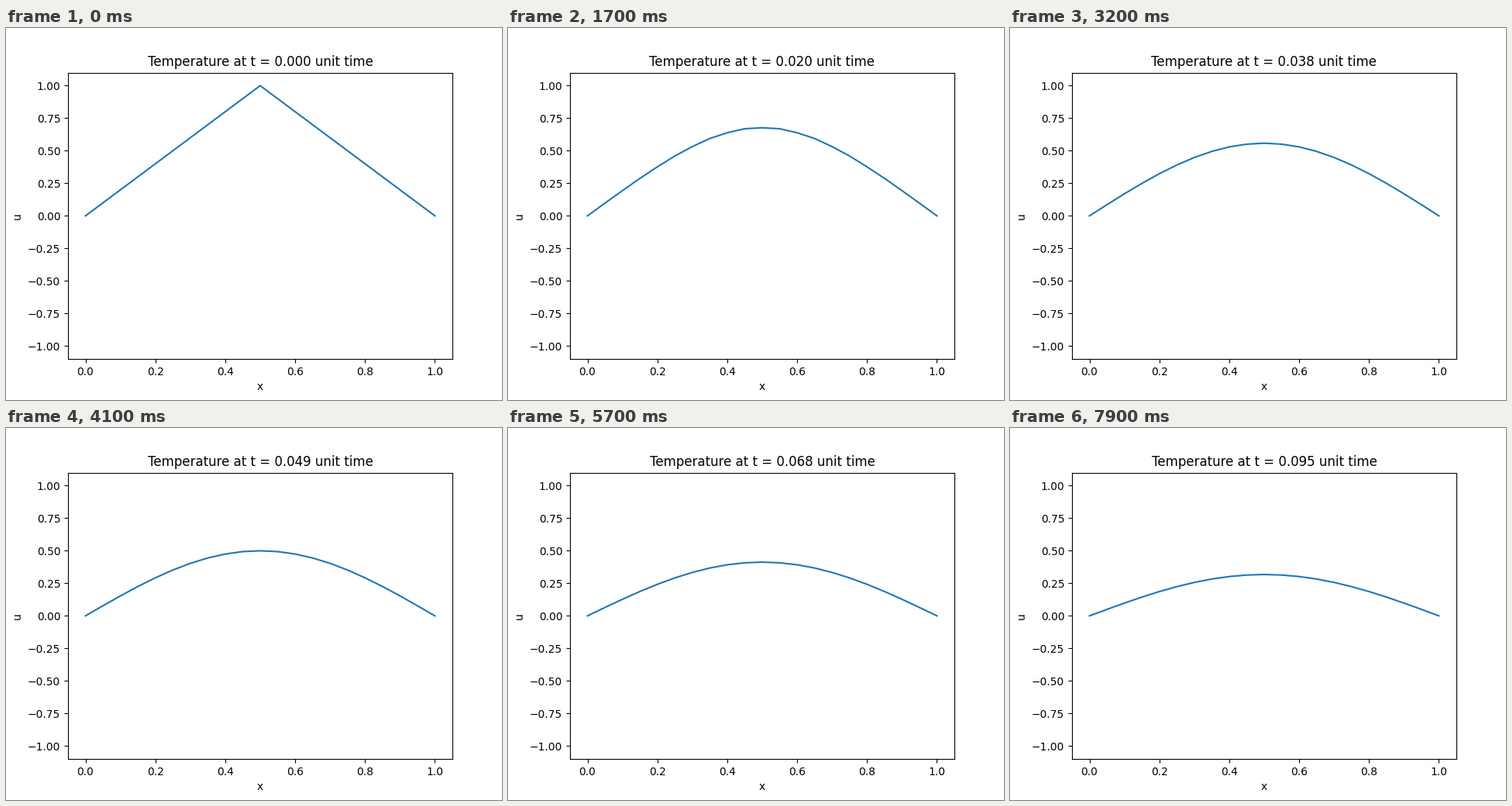
Animation of 640 by 480 pixels, one loop 8000 ms. Source, as a matplotlib script:

```python
import numpy as np
import matplotlib.pyplot as plt
from matplotlib.animation import FuncAnimation

FRAMES, INTERVAL = 80, 100
CELLS = 20
DT = 0.0012
MU = DT * CELLS**2

x = np.linspace(0, 1, CELLS + 1)


def solve(steps):
    """Explicit heat-equation steps from a hat profile, ends held at zero."""
    u = np.zeros((steps, x.size))
    u[0] = 1 - np.abs(2 * x - 1)
    for n in range(steps - 1):
        u[n + 1, 1:-1] = u[n, 1:-1] + MU * np.diff(u[n], 2)
    return u


history = solve(FRAMES)

fig, ax = plt.subplots(figsize=(6.4, 4.8), dpi=100)
line, = ax.plot(x, history[0])
ax.set_xlim(-0.05, 1.05)
ax.set_ylim(-1.1, 1.1)
ax.set_xlabel("x")
ax.set_ylabel("u")
title = ax.set_title("")


def update(n):
    line.set_ydata(history[n])
    title.set_text(f"Temperature at t = {n * DT:.3f} unit time")
    return line, title


anim = FuncAnimation(fig, update, frames=FRAMES, interval=INTERVAL,
                     repeat=True, repeat_delay=0, blit=False)
plt.show()
```
